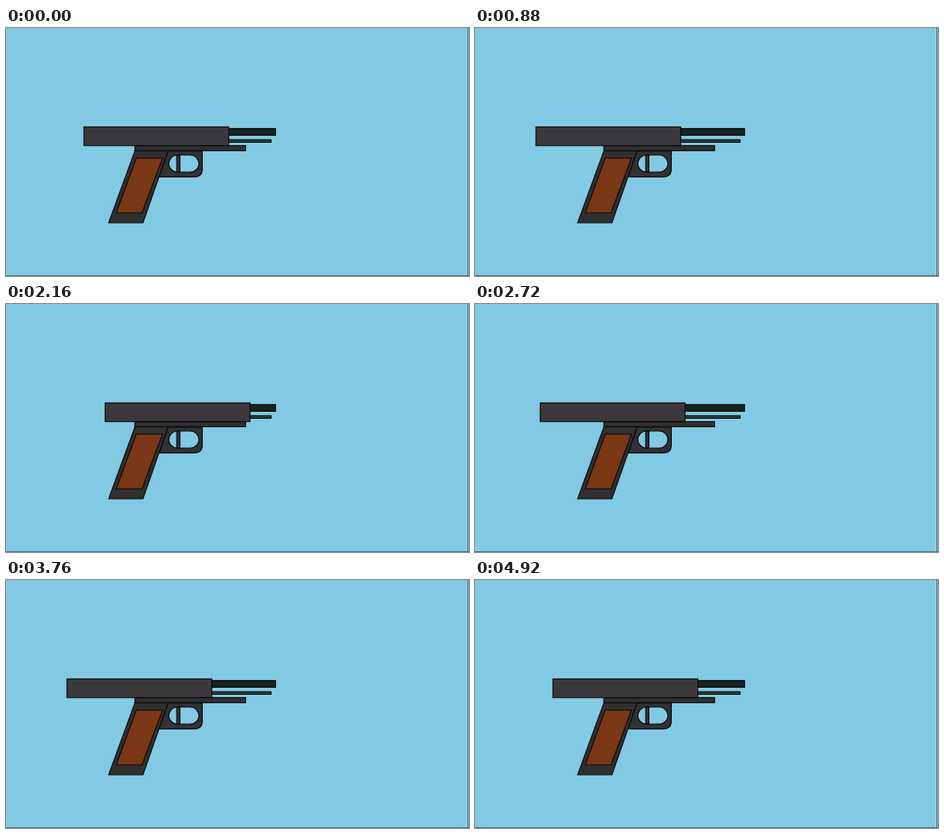
An HTML page that plays this animation: 600x322 px, repeating every 4.96 s.

```html
<!DOCTYPE html>
<html lang="en">
<head>
<meta charset="utf-8">
<title>Pistol loop</title>
<style>
  html, body { margin: 0; width: 100%; height: 100%; overflow: hidden; background: #82c9e3; }
  svg { display: block; width: 600px; height: 322px; }
  .ink { stroke: #080808; stroke-width: 1.2; }
</style>
</head>
<body>
<svg viewBox="0 0 600 322">
  <rect width="600" height="322" fill="#82c9e3"/>
  <rect y="321" width="600" height="1" fill="#41707f"/>
  <rect x="597" width="1" height="321" fill="#a3d9ea"/>
  <rect x="598" width="1" height="322" fill="#36606d"/>

  <g class="ink">
    <rect x="200" y="130.5" width="149.3" height="8.8" fill="#17231f"/>
    <rect x="200" y="145" width="143.5" height="3.4" fill="#37403c"/>
    <path d="M210 159.8H254.4V183Q254.4 193.3 244 193.3H198.5Z" fill="#323234"/>
    <path d="M167 159.5H210L177.5 253H133Z" fill="#303031"/>
    <path d="M168.8 169H202.8L176.3 240H142.8Z" fill="#793715"/>
    <rect x="211" y="165" width="39" height="22" rx="11" fill="#82c9e3"/>
    <rect x="221.2" y="165" width="4.2" height="22" fill="#323234"/>
    <rect x="167" y="152.7" width="143.5" height="6.6" fill="#303032"/>
    <rect id="slide" x="156" y="128.4" width="187.7" height="24.3" fill="#3c393d"/>
  </g>
  <g id="flash" transform="translate(360 141)" stroke="#160808" stroke-linejoin="miter" stroke-miterlimit="12"></g>
</svg>
<script>
const FRAME = 40, FRAMES = 124, TRAVEL = 15, NOTCH = 5.5, RETURN_RATE = 1.1, FLASH_FRAMES = 2;

// Each shot: frame of firing, frame at which the slide is fully back
const shots = [[-13, -4.55], [12, 20.7], [35.9, 44.6], [60.8, 69.4], [85, 93.4], [110, 118.45]];

// Star layers: outer radius, fill, line width
const layers = [
  [43, '#8e1717', 1.3],
  [34, '#cf261b', 1],
  [25, '#a81a18', 0.9],
  [18, '#e8472a', 0.7],
  [12.5, '#f9c48a', 0.5],
  [8, '#ffe52e', 0]
];

const slide = document.getElementById('slide');
const flash = document.getElementById('flash');

function starPoints(radius) {
  return Array.from({ length: 14 }, (_, i) => {
    const r = i % 2 ? radius * 0.31 : radius;
    const a = Math.PI / 2 + i * Math.PI / 7;
    return (r * Math.cos(a)).toFixed(2) + ',' + (r * Math.sin(a)).toFixed(2);
  }).join(' ');
}

for (const [radius, fill, width] of layers) {
  const star = document.createElementNS('http://www.w3.org/2000/svg', 'polygon');
  star.setAttribute('points', starPoints(radius));
  star.setAttribute('fill', fill);
  star.setAttribute('stroke-width', width);
  flash.append(star);
}

function recoil(n, fire, peak) {
  const notches = n < peak
    ? TRAVEL * (n - fire) / (peak - fire)
    : TRAVEL - RETURN_RATE * (n - peak);
  return Math.max(0, Math.round(notches));
}

function draw(ms) {
  const n = Math.floor(ms / FRAME) % FRAMES;
  const [fire, peak] = shots.filter(shot => shot[0] <= n).pop();
  slide.setAttribute('x', 156 - NOTCH * recoil(n, fire, peak));
  flash.style.display = n < fire + FLASH_FRAMES ? '' : 'none';
}

const start = performance.now();
function tick() {
  draw(performance.now() - start);
  requestAnimationFrame(tick);
}
tick();
</script>
</body>
</html>
```
